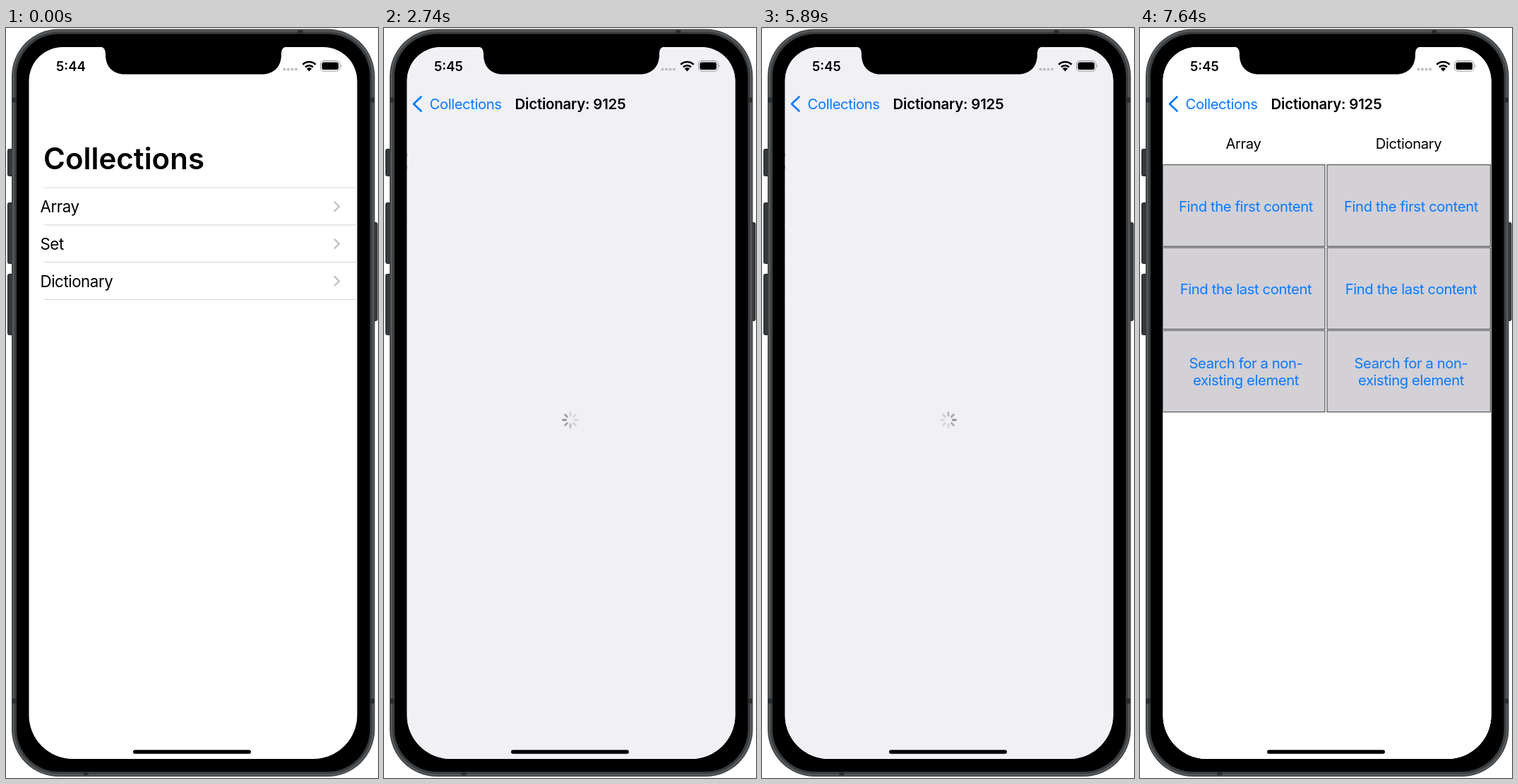
An HTML page that plays this animation: 527 px wide and 1062 px high, repeating every 8000 ms.

```html
<!DOCTYPE html>
<html lang="en">
<head>
<meta charset="utf-8">
<title>Collections</title>
<style>
  html, body { margin: 0; width: 100%; height: 100%; overflow: hidden; background: #fff; }
  svg { display: block; width: 527px; height: 1062px; }
  text { font: 400 20.3px Inter, "Noto Sans", sans-serif; letter-spacing: -.02em; }
  .large { font-size: 42px; font-weight: 600; letter-spacing: 0; }
  .row { font-size: 22.3px; }
  .title { font-size: 20.5px; font-weight: 600; letter-spacing: -.012em; }
  .clock { font-size: 18.5px; font-weight: 600; letter-spacing: 0; }
  .mid { text-anchor: middle; }
  .link { fill: #0a7aff; }
  .line { fill: none; stroke-linecap: round; stroke-linejoin: round; }
</style>
</head>
<body>
<svg viewBox="0 0 527 1062" xmlns="http://www.w3.org/2000/svg">
  <defs>
    <clipPath id="screen">
      <path d="M80.500 27H449.500A48 48 0 0 1 497.500 75V973A62 62 0 0 1 435.500 1035H94.500A62 62 0 0 1 32.500 973V75A48 48 0 0 1 80.500 27Z"/>
    </clipPath>
  </defs>

  <g fill="#35393c" stroke="#202324">
    <rect x="2.500" y="171.500" width="9" height="38" rx="2"/>
    <rect x="2.500" y="247.500" width="9" height="86" rx="2"/>
    <rect x="2.500" y="348.500" width="9" height="86" rx="2"/>
    <rect x="518" y="275.500" width="8" height="139" rx="2"/>
  </g>
  <rect x="8" y="1.500" width="514.500" height="1058.500" rx="67" fill="#3a3d3f"/>
  <rect x="10.500" y="4" width="509.500" height="1053.500" rx="64.500" fill="none" stroke="#57595b" stroke-width="2.500"/>
  <rect x="15" y="8.500" width="500.500" height="1044.500" rx="60"/>
  <path d="M9 102h6M516 102h6M9 953h6M516 953h6M417 3v5M113 1053v5" stroke="#2a2d2f" stroke-width="7"/>

  <g clip-path="url(#screen)">
    <rect x="32" y="27" width="466" height="1009" fill="#fff"/>
    <g id="list">
      <text class="large" x="53" y="200">Collections</text>
      <g id="rows"></g>
    </g>
    <rect id="dim" x="32" y="27" width="466" height="1009"/>
    <g id="detail">
      <rect x="32.500" y="27" width="466" height="1009" fill="#f1f0f5"/>
      <g id="spinner" transform="translate(264 555)"></g>
    </g>
    <g id="table">
      <rect x="32" y="27" width="466" height="1009" fill="#fff"/>
      <text class="mid" x="146.500" y="171">Array</text>
      <text class="mid" x="380.500" y="171">Dictionary</text>
      <g id="cells"></g>
    </g>
    <g id="nav">
      <path class="line" d="M52.500 97.500 42 107.500 52.500 117.500" stroke="#0a7aff" stroke-width="2.700"/>
      <text id="back" class="link" x="64.500" y="114.500">Collections</text>
      <text id="heading" class="title mid" x="264" y="114.500">Dictionary: 9125</text>
    </g>
    <text id="clock" class="clock" x="71" y="61">5:44</text>
    <g fill="#bdbdbf">
      <circle cx="394.500" cy="58.500" r="2"/><circle cx="400" cy="58.500" r="2"/>
      <circle cx="405.500" cy="58.500" r="2"/><circle cx="411" cy="58.500" r="2"/>
    </g>
    <path d="M429.500 61.500 425.800 57.600A5.300 5.300 0 0 1 433.200 57.600Z"/>
    <path d="M424 55.400A7.900 7.900 0 0 1 435 55.400M420.400 51.700A13 13 0 0 1 438.600 51.700" fill="none" stroke="#000" stroke-width="2.700"/>
    <rect x="445.500" y="46.500" width="27.500" height="14.500" rx="4.500" fill="none" stroke="#929294"/>
    <rect x="447.500" y="48.500" width="23.500" height="10.500" rx="2.800"/>
    <path d="M474.500 51.500q2 2.300 0 4.600z" fill="#929294"/>
    <rect x="180" y="1022.200" width="167" height="5.600" rx="2.800"/>
  </g>
  <path d="M132 26C139 27 141 30 141 38C141 55 152 65.500 168 65.500H363C379 65.500 390 55 390 38C390 30 392 27 399 26Z"/>
</svg>

<script>
const LOOP = 8000, PUSH = 500, STEP = 70, SETTLED = 1270, CLOCK_CHANGE = 920, LOADED = 7010;
const SPOKES = 8;
const $ = id => document.getElementById(id);

function add(parent, tag, attrs, text = '') {
  const node = document.createElementNS('http://www.w3.org/2000/svg', tag);
  for (const key in attrs) node.setAttribute(key, attrs[key]);
  node.textContent = text;
  parent.append(node);
  return node;
}

const rows = $('rows');
const separator = y => add(rows, 'path', { d: `M53.500 ${y}H498`, stroke: '#dcdcde', 'stroke-width': 1.2 });
separator(226);
['Array', 'Set', 'Dictionary'].forEach((name, i) => {
  const y = 226 + i * 52.8;
  add(rows, 'text', { class: 'row', x: 48.5, y: y + 35 }, name);
  add(rows, 'path', { class: 'line', d: `M465.500 ${y + 20.5}l6.500 6.300-6.500 6.300`, stroke: '#bfbfc3', 'stroke-width': 2.2 });
  separator(y + 52.8);
});

const actions = [['Find the first content'], ['Find the last content'], ['Search for a non-', 'existing element']];
actions.forEach((lines, i) => {
  const y = 193.7 + i * 117.3;
  [[32.5, 229.5, 150], [265, 231.5, 384]].forEach(([x, width, center]) => {
    add($('cells'), 'rect', { x, y, width, height: 115.5, fill: '#d3d0d6', stroke: '#2a2a2a', 'stroke-width': 0.9 });
    lines.forEach((line, n) => add($('cells'), 'text', {
      class: 'link mid', x: center, y: y + 65.8 + (n - (lines.length - 1) / 2) * 24
    }, line));
  });
});

const spokes = Array.from({ length: SPOKES }, (_, i) => add($('spinner'), 'path', {
  class: 'line', d: 'M0-6.300V-10.500', stroke: '#7c7c81', 'stroke-width': 2.9, transform: `rotate(${i * 360 / SPOKES})`
}));

function spin(t) {
  const head = 302 / 360 + (t - 640) / 1000 * 1.425;
  spokes.forEach((spoke, i) => {
    const lag = (((head - i / SPOKES) % 1) + 1) % 1;
    const glow = Math.max(0, 1 - lag * 2, (lag - 0.875) * 8);
    spoke.setAttribute('opacity', 0.22 + 0.66 * glow);
  });
}

// Critically damped spring of the page push
function pushProgress(t) {
  if (t < PUSH) return 0;
  if (t >= SETTLED) return 1;
  const x = (t - 470) * 0.01095;
  return 1 - (1 + x) * Math.exp(-x);
}

const shift = (id, x) => $(id).setAttribute('transform', `translate(${x} 0)`);
const show = (id, visible) => $(id).setAttribute('visibility', visible ? 'visible' : 'hidden');

function draw(time) {
  const t = time < PUSH ? time : PUSH + Math.floor((time - PUSH) / STEP) * STEP;
  const p = pushProgress(t), rest = 1 - p;
  shift('list', -139.5 * p);
  shift('detail', 465 * rest);
  shift('back', 98 * rest);
  shift('heading', 342 * rest);
  $('dim').setAttribute('opacity', 0.105 * p);
  $('nav').setAttribute('opacity', p);
  show('detail', p > 0);
  show('table', t >= LOADED);
  $('clock').textContent = t < CLOCK_CHANGE ? '5:44' : '5:45';
  spin(t);
}

const start = performance.now();
function frame() {
  draw((performance.now() - start) % LOOP);
  requestAnimationFrame(frame);
}
frame();
</script>
</body>
</html>
```
